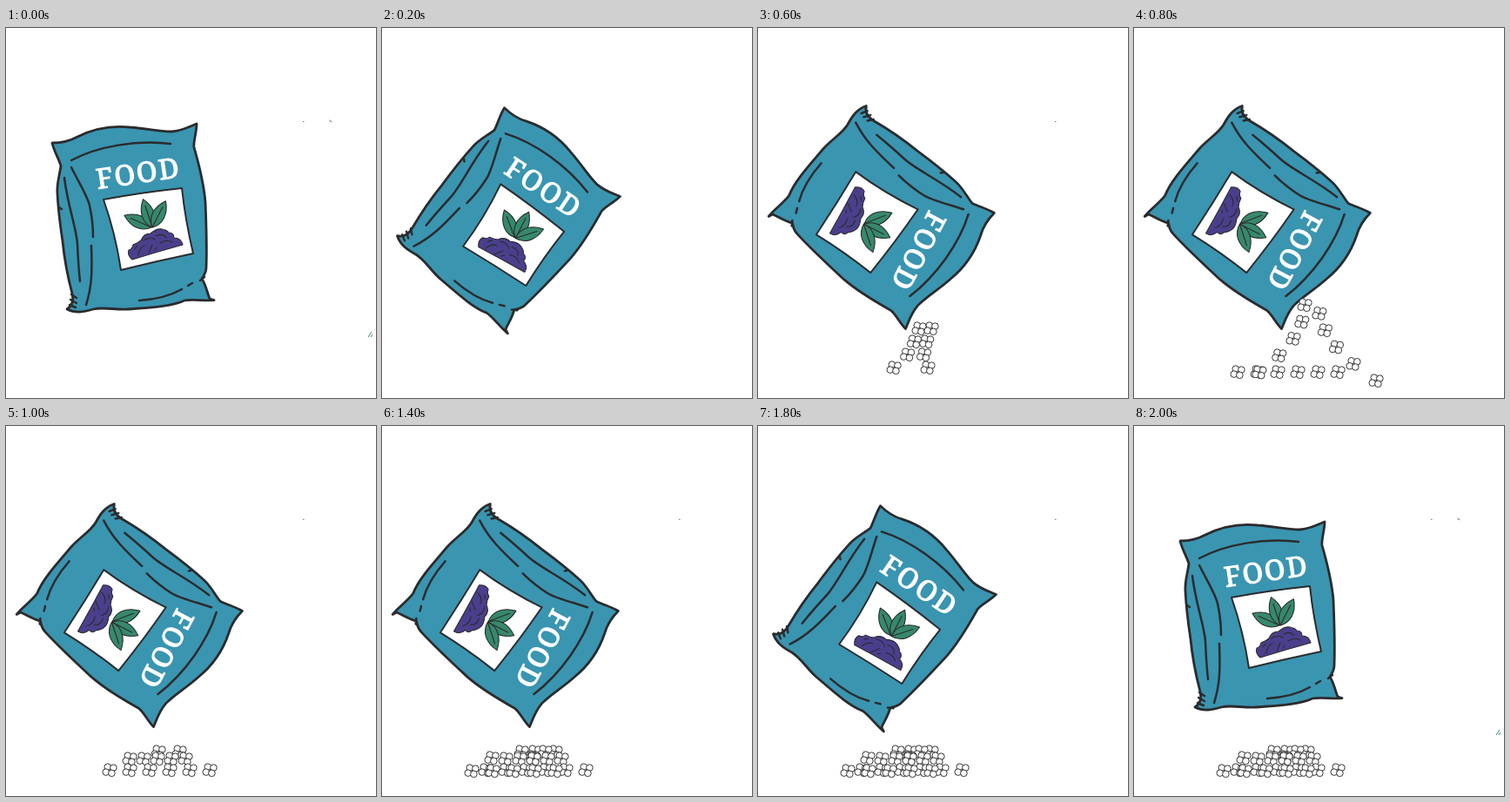
Recreate the animation shown at these times as an HTML page. Size 425x425 px, loop 2200 ms.

```html
<!DOCTYPE html>
<html lang="en">
<head>
<meta charset="utf-8">
<title>Food bag</title>
<style>
  html, body { margin: 0; width: 100%; height: 100%; overflow: hidden; background: #fff; }
  svg { display: block; width: 100%; height: 100%; }
  .ink { fill: none; stroke: #2b2b2d; stroke-width: 2.5; stroke-linecap: round; stroke-linejoin: round; }
  .thin { stroke-width: 1.1; }
  text { font: 400 32px "Noto Serif", serif; letter-spacing: 2px; text-anchor: middle; fill: #fff; stroke: #fff; stroke-width: 1.2; }
</style>
</head>
<body>
<svg viewBox="0 0 425 425">
  <defs>
    <g id="grain" fill="#fff" stroke="#333" stroke-width="1">
      <circle cx="-2.2" cy="-3.4" r="3.8"/>
      <circle cx="4.4" cy="-2.4" r="3.8"/>
      <circle cx="-4.2" cy="2.6" r="3.8"/>
      <circle cx="2.4" cy="3.8" r="3.8"/>
    </g>
    <path id="leaf" d="M0 0C-9 -8 -10 -21 0 -34C10 -21 9 -8 0 0ZM0 0V-26"/>
  </defs>

  <path id="dot" d="M341 107.5h1.5" stroke="#777"/>
  <g id="specks" fill="none">
    <path d="M371.5 106l2.5 2" stroke="#555"/>
    <path d="M416 355l4-6M419 355l2-3" stroke="#36896b"/>
  </g>

  <g id="bag">
    <path class="ink" style="fill:#3a95b1;stroke-width:2.8" d="M53 132C64 132 73 130 82 125C100 116 122 112 142 114
      C160 115 175 119 190 119C203 118 211 113 219 110C219 120 215 130 216 137C221 155 227 175 229 200
      C230 225 231 250 230 275C230 281 227 285 225 288C230 296 231 304 234 311L239 312.5
      C228 314 215 311 205 313C190 320 165 321 140 323C125 324 112 320 100 323C90 326 80 328 70 323
      C76 319 78 313 76 305C72 290 67 265 65 245C62 225 60 210 59 190C58 178 62 168 63 158C60 149 55 141 53 132Z"/>
    <path class="ink" d="M75 152C105 136 150 128 189 133M75 160C84 178 94 194 96 204Q100 222 100 240
      M67 172C71 205 81 230 82 248Q83 272 85 291M98 250C99 278 99 296 92 318
      M153 313Q183 311 202 300M209 296L214 293M223 290L228 286
      M75 306L81 310M74 312L81 316M73 318L80 321M61 206L64 208"/>
    <path class="ink" style="fill:#fff;stroke-width:2" d="M112 197Q155 189 202 184Q206 221 215 259Q172 268 132 278Q126 237 112 197Z"/>
    <g class="ink thin" style="fill:#36896b">
      <use href="#leaf" transform="translate(167 229) rotate(-66)"/>
      <use href="#leaf" transform="translate(168 229) rotate(-18)"/>
      <use href="#leaf" transform="translate(168 229) rotate(27)"/>
    </g>
    <path class="ink thin" style="fill:#4a3f8c" d="M145 266Q139 261 141 255Q145 254 146 249Q152 247 155 244
      Q158 236 166 236Q173 230 179 231Q185 232 187 235Q193 235 193 241Q201 241 203 249Q174 257 145 266Z"/>
    <path class="ink thin" d="M152 261Q153 252 159 250M164 259L168 249M158 244Q165 239 171 243M172 239Q180 235 184 241
      M177 247Q184 242 191 246M148 254L151 250M171 255L173 252"/>
    <g id="label"><text y="12" transform="translate(152 166) rotate(-8.5)">FOOD</text></g>
  </g>
  <g id="grains"></g>
</svg>

<script>
const STEP = 200, STEPS = 11;

const repeat = (count, place) => Array.from({ length: count }, (_, i) => place(i));
const row = (y, x, gap, count) => repeat(count, i => [x + gap * i, y]);

// Pairs of grains that drift apart as they fall.
const firstFall = repeat(8, i => {
  const level = i >> 1, side = i % 2 ? 1 : -1;
  return [192 - 5.5 * level + side * (7 + level ** 4 / 6.5), 345 + 15 * level];
});

// A full stream that fans out towards the ground.
const stream = repeat(10, i => {
  const fall = i / 9, side = i % 2 ? 1 : -1;
  return [204 + side * (8 + 66 * fall ** 2), 318 + 87 * fall];
});

const heap = [...row(374, 175, 24, 2), ...row(382, 142, 16, 5), ...row(395, 119, 23, 6)];
const topUp = [...row(374, 160, 27, 2), ...row(381, 126, 48, 2), ...row(396, 103, 24, 5)];

function grainsAt(step) {
  if (step < 3) return [];
  if (step === 3) return firstFall;
  if (step === 4) return [...heap.slice(-6), ...stream];
  if (step === 5) return heap;
  if (step === 6) return [...heap, ...stream];
  return [...heap, ...topUp];
}

const byId = id => document.getElementById(id);
const show = (id, visible) => byId(id).setAttribute("visibility", visible ? "visible" : "hidden");
const rotate = (id, angle, x, y) => byId(id).setAttribute("transform", `rotate(${angle} ${x} ${y})`);
const grainMarkup = ([x, y]) => `<use href="#grain" x="${x}" y="${y}"/>`;
const byHeight = (a, b) => a[1] - b[1];

function draw(step) {
  const angle = 45 * Math.min(step, 3, STEPS - 1 - step);
  rotate("bag", angle, 145.5, 217.5);
  rotate("label", -0.065 * angle, 122, 205); // lettering lags behind the bag
  byId("grains").innerHTML = grainsAt(step).sort(byHeight).map(grainMarkup).join("");
  show("dot", step !== 1 && step !== 4);
  show("specks", angle === 0);
}

let shown = -1;
function tick() {
  const step = Math.floor(performance.now() / STEP) % STEPS;
  if (step !== shown) draw(shown = step);
  requestAnimationFrame(tick);
}
tick();
</script>
</body>
</html>
```
